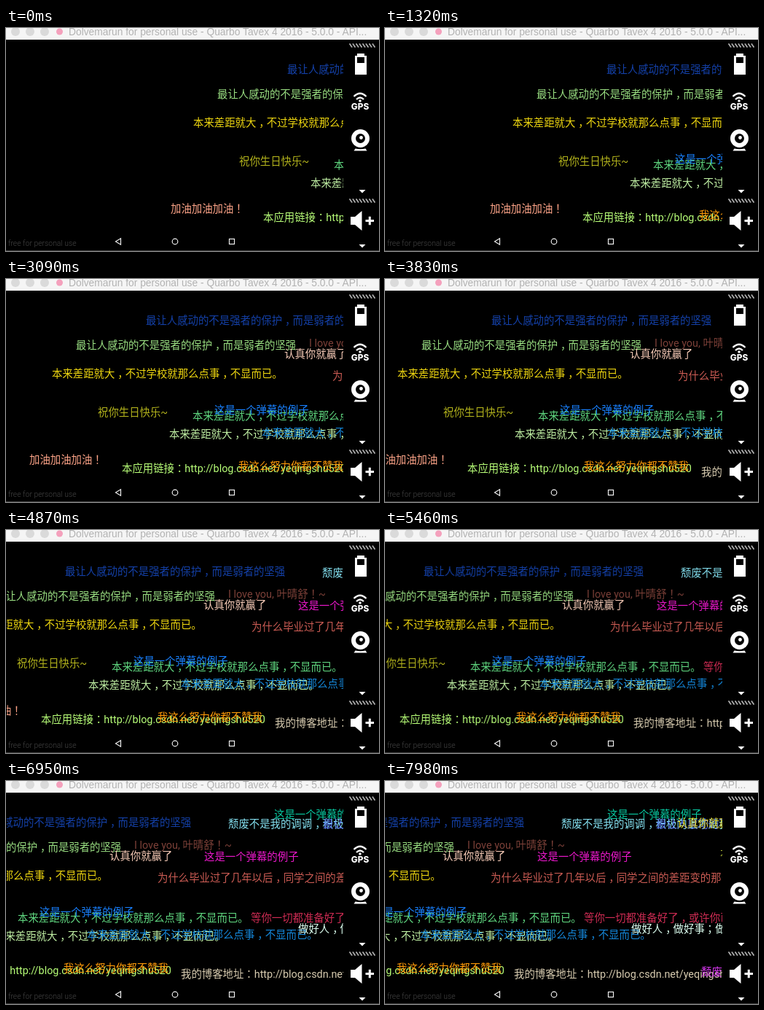
Animation of 512x306 px, one loop 8 s. Source, as an HTML page:

```html
<!DOCTYPE html>
<html lang="zh-Hant">
<head>
<meta charset="utf-8">
<title>Bullet comments</title>
<style>
  html, body { margin: 0; width: 100%; height: 100%; overflow: hidden; background: #000; }
  svg { display: block; width: 100vw; height: 100vh; }
  .comments { font: 14.4px Roboto, 'Noto Sans CJK TC', 'Noto Sans CJK SC', sans-serif; }
  .low { font-family: 'Noto Sans CJK SC', sans-serif; }
  .title { font: 13.8px 'Liberation Sans', sans-serif; fill: #b2b2b2; }
  .note { font: 300 10.4px Roboto, sans-serif; fill: #444; }
  .gps { font: 800 11.8px Inter, sans-serif; text-anchor: middle; }

  /* The screen refreshes in jumps of about 147 ms. */
  #track { animation: drift 8s infinite; }
  @keyframes drift {
    0%      { transform: translateX(0);      animation-timing-function: steps(9); }
    16.5%   { transform: translateX(-82px);  animation-timing-function: steps(7); }
    29.375% { transform: translateX(-148px); animation-timing-function: steps(10); }
    47.875% { transform: translateX(-240px); animation-timing-function: steps(7); }
    60.875% { transform: translateX(-305px); animation-timing-function: steps(8); }
    75.75%  { transform: translateX(-380px); animation-timing-function: steps(13); }
    99.75%, 100% { transform: translateX(-497px); }
  }
</style>
</head>
<body>
<svg viewBox="0 0 512 306">
  <defs>
    <clipPath id="screen"><rect x="1" y="16" width="462" height="290"/></clipPath>
    <pattern id="ticks" width="4.5" height="6" patternUnits="userSpaceOnUse">
      <path d="M.5 .5L4 5.500" stroke="#ccc" stroke-width="1.5"/>
    </pattern>
    <rect id="hatch" width="36" height="6" fill="url(#ticks)"/>
    <path id="more" d="M-4.5-2h9L0 2.5z"/>
  </defs>
  <rect width="512" height="306"/>

  <g class="comments" clip-path="url(#screen)"><g id="track"></g></g>

  <text class="note" x="3" y="298.5">free for personal use</text>
  <g fill="none" stroke="#eee" stroke-width="1.2">
    <path d="M157.5 288.8v8.4l-7-4.2z"/>
    <circle cx="232" cy="293" r="3.8"/>
    <rect x="306.5" y="289.5" width="7" height="7"/>
  </g>
  <rect y="305" width="512" height="1" fill="#3a3a3a"/>

  <rect width="512" height="16" fill="#f5f5f5"/>
  <g fill="#dadada">
    <circle cx="13" cy="5" r="6"/>
    <circle cx="33" cy="5" r="6"/>
    <circle cx="53" cy="5" r="6"/>
  </g>
  <circle cx="73.5" cy="5" r="4.5" fill="#f4a0bc"/>
  <text class="title" x="86" y="10.3">Dolvemarun for personal use - Quarbo Tavex 4 2016 - 5.0.0 - API...</text>

  <g fill="#fff">
    <use href="#hatch" x="471" y="21"/>
    <use href="#hatch" x="471" y="234"/>
    <path d="M482 35h10v3h3v26h-16v-26h3z"/>
    <rect x="482" y="40" width="10" height="8" fill="#000"/>

    <path d="M477.500 94q8.500-8.500 17 0M481 98q5-5 10 0" fill="none" stroke="#fff" stroke-width="2.2"/>
    <circle cx="486" cy="100" r="1.8"/>
    <text class="gps" x="486" y="112.3">GPS</text>

    <circle cx="486.5" cy="151.5" r="12.5"/>
    <circle cx="486.5" cy="151.5" r="6.5" fill="#000"/>
    <circle cx="487.5" cy="150.5" r="2.4"/>
    <path d="M479.500 165.500q7 1.500 14 0l2 3h-18z"/>

    <path d="M473 259h6l9.500-8v27l-9.500-8h-6z"/>
    <path d="M493.500 264.500h11.500M499.300 258.700v11.600" stroke="#fff" stroke-width="3"/>
    <use href="#more" x="489" y="224"/>
    <use href="#more" x="489" y="299"/>
  </g>
</svg>
<script>
  const MOVED = '最让人感动的不是强者的保护，而是弱者的坚强';
  const GAP = '本来差距就大，不过学校就那么点事，不显而已。';
  const SAMPLE = '这是一个弹幕的例子';
  const WIN = '认真你就赢了';
  const POSITIVE = '颓废不是我的调调，积极向上才是我的风格';
  const BLOG = 'http://blog.csdn.net/yeqingshu520';

  // start x, middle y, colour, text
  const comments = [
    [386, 57, '#1440a8', MOVED],
    [290, 91, '#98dc80', MOVED],
    [257, 130, '#f0d810', GAP],
    [320, 183, '#b4b41c', '祝你生日快乐~'],
    [450, 188, '#60d880', GAP],
    [418, 213, '#c0f0a4', GAP],
    [226, 248, '#ffa488', '加油加油加油！'],
    [353, 260, '#b8ff78', '本应用链接：' + BLOG],
    [480, 180, '#1880ff', SAMPLE],
    [513, 257, '#ff9a08', '我这么努力你都不赞我'],
    [545, 211, '#1488dc', GAP],
    [576, 103, '#f8ccb8', WIN],
    [610, 88, '#7c4038', 'I love you, 叶晴舒！~'],
    [642, 133, '#cc5c54', '为什么毕业过了几年以后，同学之间的差距变的那么大'],
    [674, 265, '#d8ccb0', '我的博客地址：' + BLOG],
    [706, 104, '#ec18cc', SAMPLE],
    [739, 59, '#84e0f0', POSITIVE],
    [770, 188, '#d02c54', '等你一切都准备好了，或许你已经错过了'],
    [802, 46, '#08c8a0', SAMPLE],
    [835, 203, '#dcfff0', '做好人，做好事；做好自己'],
    [869, 59, '#5068e0', MOVED],
    [898, 58, '#e8dc28', WIN],
    [931, 262, '#d838f0', POSITIVE],
    [957, 99, '#a8b434', GAP]
  ];

  const svgNode = (name, attributes, text = '') => {
    const node = document.createElementNS('http://www.w3.org/2000/svg', name);
    for (const key in attributes) node.setAttribute(key, attributes[key]);
    node.textContent = text;
    return node;
  };

  // Commas and full stops sit on the baseline; commas are centred in their cell.
  const COMMA_SHIFT = 4;
  const track = document.getElementById('track');
  for (const [x, y, fill, text] of comments) {
    const line = svgNode('text', { x, y: y + 5.4, fill });
    let shift = 0;
    for (const part of text.split(/([，。])/)) {
      if (!part) continue;
      const target = part === '，' ? COMMA_SHIFT : 0;
      const span = svgNode('tspan', { dx: target - shift }, part);
      if (/[，。]/.test(part)) {
        span.setAttribute('class', 'low');
        span.setAttribute('lang', 'zh-Hans');
      }
      line.append(span);
      shift = target;
    }
    track.append(line);
  }
</script>
</body>
</html>
```
